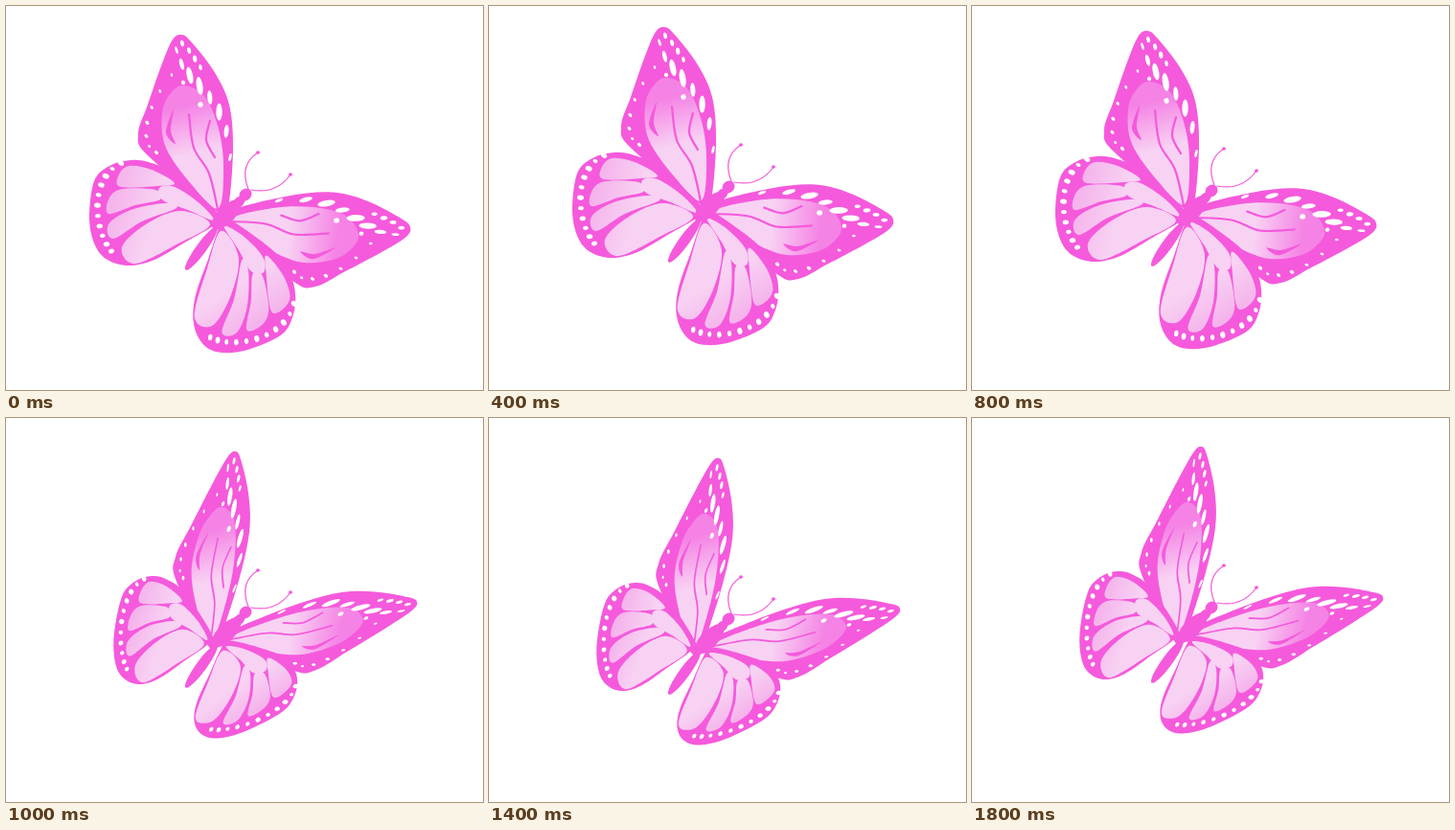
Animation of 498x401 px, one loop 2000 ms. Source, as an HTML page with a canvas:

```html
<!DOCTYPE html>
<html lang="en">
<head>
<meta charset="utf-8">
<title>Butterfly</title>
<style>
html, body { margin: 0; width: 100%; height: 100%; overflow: hidden; background: #fff; }
canvas { display: block; }
</style>
</head>
<body>
<canvas id="stage" width="498" height="401"></canvas>
<script>
const ctx = document.getElementById('stage').getContext('2d');
const DARK = '#f55adc', MID = '#f583e5', SOFT = '#f4aeea', PALE = '#f8d2f3';
const STEP = 200;
// Height of the body at each step; open and raised wings alternate.
const LIFT = [0, -4, -8, -10, -4, 6, 8, 13, 12, 1];

const parse = text => text.split(' ').map(pair => pair.split(',').map(Number));
const random = seed => { const v = Math.sin(seed * 12.9898) * 43758.5453; return v - Math.floor(v); };

// Smooth curve through a few key points.
function curve(text, closed = true) {
  const pts = parse(text), n = pts.length, path = new Path2D();
  const at = i => closed ? pts[(i + n) % n] : pts[Math.max(0, Math.min(n - 1, i))];
  path.moveTo(...pts[0]);
  for (let i = 0; i < (closed ? n : n - 1); i++) {
    const [a, b, c, d] = [at(i - 1), at(i), at(i + 1), at(i + 2)];
    path.bezierCurveTo(
      b[0] + (c[0] - a[0]) / 6, b[1] + (c[1] - a[1]) / 6,
      c[0] - (d[0] - b[0]) / 6, c[1] - (d[1] - b[1]) / 6, c[0], c[1]);
  }
  if (closed) path.closePath();
  return path;
}

function bezier([p, q, r, s], t) {
  const u = 1 - t;
  return [0, 1].map(k => u * u * u * p[k] + 3 * u * u * t * q[k] + 3 * u * t * t * r[k] + t * t * t * s[k]);
}

// Spots spread along a Bezier, pointing at the wing root, largest midway.
function spotRow(text, count, length, width, swell, root) {
  const path = new Path2D(), points = parse(text);
  for (let i = 0; i < count; i++) {
    const t = i / (count - 1), [x, y] = bezier(points, t);
    const size = (1 - swell + swell * Math.sin(Math.PI * t)) * (0.8 + 0.4 * random(i + count));
    const angle = Math.atan2(root[1] - y, root[0] - x);
    path.moveTo(x + length * size * Math.cos(angle), y + length * size * Math.sin(angle));
    path.ellipse(x, y, length * size, width * size, angle, 0, 2 * Math.PI);
  }
  return path;
}

function shade(x1, y1, x2, y2, rim, paleEnd, rimStart) {
  const fill = ctx.createLinearGradient(x1, y1, x2, y2);
  fill.addColorStop(paleEnd, PALE);
  fill.addColorStop(rimStart, rim);
  return fill;
}

// Each wing is drawn once, as the open left one; three anchors place every copy.
const foreRoot = [222, 212], hindRoot = [216, 228];
const fore = {
  anchors: '183,30 138,134 222,212',
  edge: curve('183,30 193,37 217,68 233,103 237,150 232,210 222,216 149,157 138,134 148,103 163,60 174,35'),
  cells: [curve('172,91 186,83 207,94 221,125 227,165 222,211 195,188 167,148 163,112')],
  fill: shade(214, 200, 186, 86, MID, 0.42, 0.85),
  veins: [curve('191,113 196,148 212,175 221,212', false), curve('213,120 209,140 218,158', false)],
  notch: curve('175,108 167,132 177,144 172,130'),
  spots: [
    spotRow('178,46 186,85 230,85 234,158', 8, 8.5, 3, 0.5, foreRoot),
    spotRow('184,39 192,46 197,55 203,64', 4, 3.5, 2, 0, foreRoot),
    spotRow('173,72 145,105 138,145 157,153', 7, 2, 1.4, 0, foreRoot),
    spotRow('185,80 191,86 197,95 203,103', 2, 2.8, 2.6, 0, foreRoot)
  ]
};
const hind = {
  anchors: '130,161 128,271 216,228',
  edge: curve('130,161 108,167 92,183 87,222 93,250 106,265 128,271 155,265 190,245 216,230 224,220 180,178 152,164'),
  cells: [
    '117,178 128,167 152,171 176,185 158,188 120,189',
    '108,200 122,191 156,192 161,202 135,208 107,217',
    '107,228 130,213 165,206 178,211 142,225 112,243',
    '121,252 146,228 182,214 213,228 180,248 135,269',
    '160,190 176,189 202,206 217,224 190,213 164,203'
  ].map(text => curve(text)),
  fill: shade(210, 225, 104, 195, SOFT, 0.5, 1),
  veins: [],
  spots: [spotRow('120,164 86,180 92,235 110,256', 11, 3, 2.2, 0, hindRoot)]
};

function basis(text) {
  const [p, q, o] = parse(text);
  return new DOMMatrix([p[0] - o[0], p[1] - o[1], q[0] - o[0], q[1] - o[1], o[0], o[1]]);
}
const place = (shape, target) => ({ shape, matrix: basis(target).multiply(basis(shape.anchors).inverse()) });

const poses = [
  { rest: 0, wings: [
    place(fore, fore.anchors),
    place(hind, hind.anchors),
    place(fore, '422,231 323,293 232,224'),
    place(hind, '302,300 196,332 224,232')
  ] },
  { rest: -4, wings: [
    place(fore, '240,25 177,135 214,226'),
    place(hind, '152,155 138,268 209,226'),
    place(fore, '429,182 324,253 232,221'),
    place(hind, '304,262 197,309 226,231')
  ] }
];

function drawWing({ shape, matrix }) {
  ctx.save();
  ctx.transform(matrix.a, matrix.b, matrix.c, matrix.d, matrix.e, matrix.f);
  ctx.fillStyle = DARK;
  ctx.fill(shape.edge);
  ctx.fillStyle = shape.fill;
  shape.cells.forEach(cell => ctx.fill(cell));
  ctx.fillStyle = DARK;
  if (shape.notch) ctx.fill(shape.notch);
  ctx.lineWidth = 2.2;
  shape.veins.forEach(vein => ctx.stroke(vein));
  ctx.fillStyle = '#fff';
  shape.spots.forEach(row => ctx.fill(row));
  ctx.restore();
}

function oval(x, y, rx, ry, angle = 0) {
  ctx.beginPath();
  ctx.ellipse(x, y, rx, ry, angle, 0, 2 * Math.PI);
  ctx.fill();
}

function antenna(x1, y1, cx, cy, x2, y2) {
  ctx.beginPath();
  ctx.moveTo(x1, y1);
  ctx.quadraticCurveTo(cx, cy, x2, y2);
  ctx.stroke();
  oval(x2, y2, 2, 1.7);
}

function drawBody() {
  ctx.fillStyle = DARK;
  oval(204, 253, 28, 5.5, -0.94);
  oval(230, 218, 20, 9, -0.8);
  oval(243, 205, 8, 5, -0.8);
  oval(250, 197, 7, 6, -0.8);
  ctx.lineWidth = 1.2;
  antenna(253, 191, 243, 166, 263, 153);
  antenna(256, 192, 282, 197, 297, 176);
}

function draw(time) {
  const step = Math.floor(time / STEP) % LIFT.length;
  const { rest, wings } = poses[step % 2];
  ctx.setTransform(1, 0, 0, 1, 0, 0);
  ctx.fillStyle = '#fff';
  ctx.fillRect(0, 0, 498, 401);
  ctx.strokeStyle = DARK;
  ctx.lineCap = ctx.lineJoin = 'round';
  ctx.translate(0, LIFT[step] - rest);
  wings.forEach(drawWing);
  ctx.translate(0, rest);
  drawBody();
}

const start = performance.now();
function tick() {
  draw(performance.now() - start);
  requestAnimationFrame(tick);
}
tick();
</script>
</body>
</html>
```
